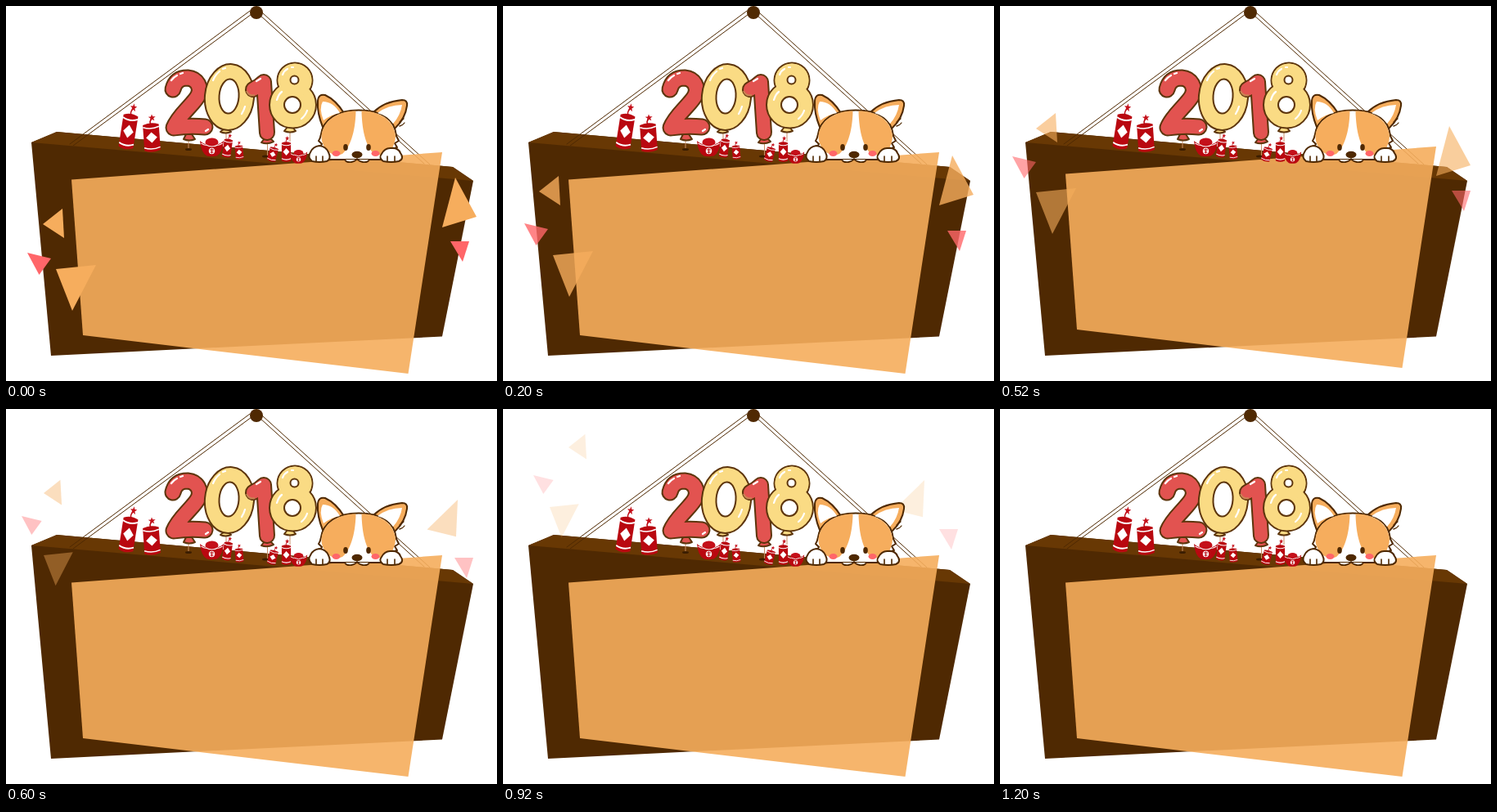
Recreate the animation shown at these times as an HTML page. Size 600 by 459 pixels, loop 1.4 s.

```html
<!DOCTYPE html>
<html lang="en">
<head>
<meta charset="utf-8">
<title>New year sign</title>
<style>
  html, body { margin: 0; height: 100%; overflow: hidden; background: #fff; }
  svg { display: block; width: 100%; height: 100%; }
  .line { fill: none; stroke: #4f2902; stroke-linecap: round; stroke-linejoin: round; }
  .out { stroke: #5d350c; stroke-width: 2; stroke-linejoin: round; }
  .tube { fill: none; stroke-linecap: round; stroke-linejoin: round; }
  .shine { fill: none; stroke: #fff; stroke-width: 2.2; stroke-linecap: round; }
  .orange { fill: #f6ad5d; }
  .pink { fill: #ff6669; }
  .red { fill: #e25350; }
  .yellow { fill: #fadb84; }
  .white { fill: #fff; }
</style>
</head>
<body>
<svg viewBox="0 0 600 459">
  <defs>
    <g id="cracker">
      <path d="M0-18Q-2-21 2-25" fill="none" stroke="#b90810" stroke-width="1.6"/>
      <path d="M2-30.500l1.200 3 3.400.2-2.700 2 1 3.300-2.900-1.900-2.900 1.900 1-3.300-2.700-2 3.400-.2z" fill="#c4101a"/>
      <path d="M-10-17Q0-21 10-17V17Q0 21-10 17Z" fill="#b90810"/>
      <path d="M-10-14Q0-10 10-14M-10 13Q0 17 10 13" fill="none" stroke="#fff" stroke-width="1.700"/>
      <path d="M0-7L7 0 0 7-7 0Z" fill="#fff"/>
    </g>
    <g id="ingot">
      <ellipse cy="-6" rx="8" ry="5.500" fill="#c4101a"/>
      <path d="M-14.500-8Q-10-4-7-4Q0 0 7-4Q10-4 14.500-8Q13 7 6 10.500Q0 12-6 10.500Q-13 7-14.500-8Z" fill="#b90810"/>
      <path d="M-13-5Q-8-2-7-3Q0 1 7-3Q8-2 13-5" fill="none" stroke="#fff" stroke-width="1.200"/>
      <circle cy="4.500" r="3.700" fill="#fff"/>
      <path d="M-2.500 3h5M-2 6h4M0 1.500v6" stroke="#b90810"/>
    </g>
  </defs>

  <path fill="#4f2902" d="M31 167L62 154 546 197 571 214 533 404.500 55 428Z"/>
  <path fill="#683804" d="M31 167L62 154 546 197 571 214Z"/>
  <path class="line" d="M298 6L78 169M300 10L82 171M313 8L518 194M309 10L511 193"/>
  <circle cx="306" cy="8" r="8" fill="#4f2902"/>

  <path id="panel" class="orange" fill-opacity=".9" d="M80 212.500L533 179 491.500 450 94 403Z"/>
  <g id="confetti"></g>

  <!-- balloon strings and knots -->
  <path d="M223 163V176M269 153V168M319.500 165V188M347 152V166" fill="none" stroke="#c98f68"/>
  <ellipse cx="223" cy="175.500" rx="4" ry="1.500" fill="#3a1d00"/>
  <ellipse cx="317" cy="184" rx="4" ry="1.500" fill="#3a1d00"/>
  <g class="out">
    <path class="red" d="M220 157L217 163Q224 166 231 163L227 157Z"/>
    <path class="yellow" d="M267 150L262 154Q268 157 275 154L271 150Z"/>
    <path class="red" d="M316 162L312 167Q319 170 327 166L322 161Z"/>
    <path class="yellow" d="M344 148L340 153Q347 156 354 153L350 148Z"/>
  </g>

  <!-- digits -->
  <g id="two"></g>
  <ellipse class="out yellow" cx="273" cy="111.500" rx="30" ry="40.500" transform="rotate(5 273 111)"/>
  <ellipse class="out white" cx="272.500" cy="110.500" rx="12" ry="21" transform="rotate(4 272 111)"/>
  <g id="one"></g>
  <g class="out yellow">
    <circle cx="353" cy="91" r="21.500"/>
    <circle cx="350.500" cy="121" r="28.500"/>
  </g>
  <circle class="yellow" cx="353" cy="91" r="20.500"/>
  <circle class="out white" cx="352.500" cy="90.500" r="5"/>
  <circle class="out white" cx="350" cy="121" r="10"/>
  <path class="shine" d="M202 91Q205 87 209 85M213 83L216 82M253 91Q256 84 261 80M265 77L268 76M306 92L311 89M338 84Q340 79 344 77M349 75L351 75M331 115Q333 108 337 105M247 151L244 153M288 132Q291 127 292 123M368 128Q366 134 361 138"/>

  <g id="goods"></g>

  <!-- dog: ears, head, patches, muzzle, paws -->
  <g class="line" stroke-width="2">
    <path style="fill:#f6ad5d" d="M387 148Q380 131 381 116Q382 107 390 109Q403 115 413 131ZM449 130Q462 117 484 115Q491 115 490 122Q488 138 475 150Z"/>
    <path style="fill:#fff" d="M396 188Q387 182 388 176L383 174 386 169 382 165Q384 162 384.500 159C387 138 406 127.500 431 127.500C458 127.500 475 138 477 159L480 165 475 168 478 173 472 175Q472 182 464 188Z"/>
  </g>
  <path class="orange" d="M427.500 128.500C407 128.500 387.500 139 385.500 159Q385 168 392 177Q402 185 411 181C420 174 427 155 427.500 128.500ZM434.500 128.500C456 128.500 474 139 476 159Q476 168 470 177Q460 185 450 181C441 174 435 155 434.500 128.500Z"/>
  <path class="white" d="M387 117Q382 125 388 140Q397 133 408 131Q400 117 387 117ZM484 121Q467 121 454 131Q466 134 473 144Q482 134 484 121Z"/>
  <g class="pink">
    <ellipse cx="403.500" cy="180.500" rx="5" ry="3.500"/>
    <ellipse cx="451.500" cy="180.500" rx="5" ry="3.500"/>
  </g>
  <path class="line" style="fill:#fff" stroke-width="1.800" d="M396 188H414Q416 192 422 191Q427 190 429 187Q431 190 436 191Q442 192 444 188H458"/>
  <g fill="#4f2902">
    <ellipse cx="415" cy="173" rx="2.800" ry="4"/>
    <ellipse cx="443" cy="173" rx="2.800" ry="4"/>
    <ellipse cx="429" cy="182" rx="6.500" ry="4.200"/>
  </g>
  <g class="line" stroke-width="2">
    <path style="fill:#fff" d="M374 190Q368 185 372 179Q375 172 383 171Q391 172 394 179Q398 187 392 190Q383 192 374 190ZM461 190Q455 186 459 181Q463 173 471 174Q479 173 482 180Q487 187 480 190Q471 192 461 190Z"/>
    <path d="M379 184V190M387 184V190M466 184V190M475 184V190" stroke-width="1.600"/>
    <path d="M481 142L486 138M481 147Q485 146 487 143" stroke-width="1.300"/>
  </g>
</svg>
<script>
const $ = id => document.getElementById(id);
const use = (id, x, y, turn, sx, sy = sx) =>
  `<use href="#${id}" transform="translate(${x} ${y}) rotate(${turn}) scale(${sx} ${sy})"/>`;
const tube = (d, color, width) =>
  `<path class="tube" d="${d}" stroke="#5d350c" stroke-width="${width + 2}"/>` +
  `<path class="tube" d="${d}" stroke="${color}" stroke-width="${width - 2}"/>`;

$('two').innerHTML = tube('M204 102C207 90 215 88 222 88C234 89 239 100 235 109C230 120 211 133 205 149Q224 146 243 148', '#e25350', 19);
$('one').innerHTML = tube('M302 102Q310 98 315 93L319 155', '#e25350', 18) +
  '<path d="M294 104Q297 111 304 109" fill="none" stroke="#c98253" stroke-width="2"/>';
$('goods').innerHTML =
  use('cracker', 149.5, 153.5, 9, .9, 1.15) + use('cracker', 178, 161, -4, .98, .93) +
  use('cracker', 270.5, 174, 8, .52, .6) + use('cracker', 285, 179, -5, .48, .45) +
  use('cracker', 326, 181.500, 14, .52, .47) + use('cracker', 342.500, 178.500, 0, .56, .64) +
  use('ingot', 251.500, 173, 0, 1) + use('ingot', 357.500, 184.500, 0, .74);

// Each triangle: its shape, its anchor at every step, and its size and turn once it has left the board.
const triangles = [
  { kind: 'orange', d: 'M0 0L24-19 26 17Z', size: .85, turn: 0,
    path: [[45, 267], [44, 227], [44, 150], [46, 103], [80, 47], [99, 16]] },
  { kind: 'orange', d: 'M0 0L49-5 20 51Z', size: .73, turn: 0,
    path: [[61, 322], [61, 305], [44, 228], [46, 179], [57, 120], [74, 76]] },
  { kind: 'pink', d: 'M0 0L29 7 14.500 27Z', size: .85, turn: 0,
    path: [[26, 302], [26, 266], [15, 184], [19, 131], [37, 81], [61, 22]] },
  { kind: 'orange', d: 'M0 0L26 48-16 61Z', size: .83, turn: 31,
    path: [[549, 210], [549, 183], [549, 147], [552, 111], [515, 87], [496, 41]] },
  { kind: 'pink', d: 'M0 0H23L15 25Z', size: 1, turn: 0,
    path: [[543, 288], [543, 275], [552, 226], [548, 182], [533, 147], [508, 112]] }
];
$('confetti').innerHTML = triangles.map(t => `<path class="${t.kind}" d="${t.d}"/>`).join('');
const shapes = [...$('confetti').children];

const stepTime = 200, steps = 7;
function draw() {
  const step = Math.floor(performance.now() / stepTime) % steps;
  $('panel').setAttribute('transform', `translate(0 ${step % 3 === 2 ? -7 : 0})`);
  $('confetti').style.display = step < 6 ? '' : 'none';
  if (step < 6) triangles.forEach((t, i) => {
    const [x, y] = t.path[step], away = step > 2;
    shapes[i].setAttribute('transform',
      `translate(${x} ${y}) rotate(${away ? t.turn : 0}) scale(${away ? t.size : 1})`);
    shapes[i].style.opacity = Math.max(1 - step * .2, .1);
    shapes[i].style.fill = step === 5 ? '#f8875a' : '';
  });
  requestAnimationFrame(draw);
}
draw();
</script>
</body>
</html>
```
